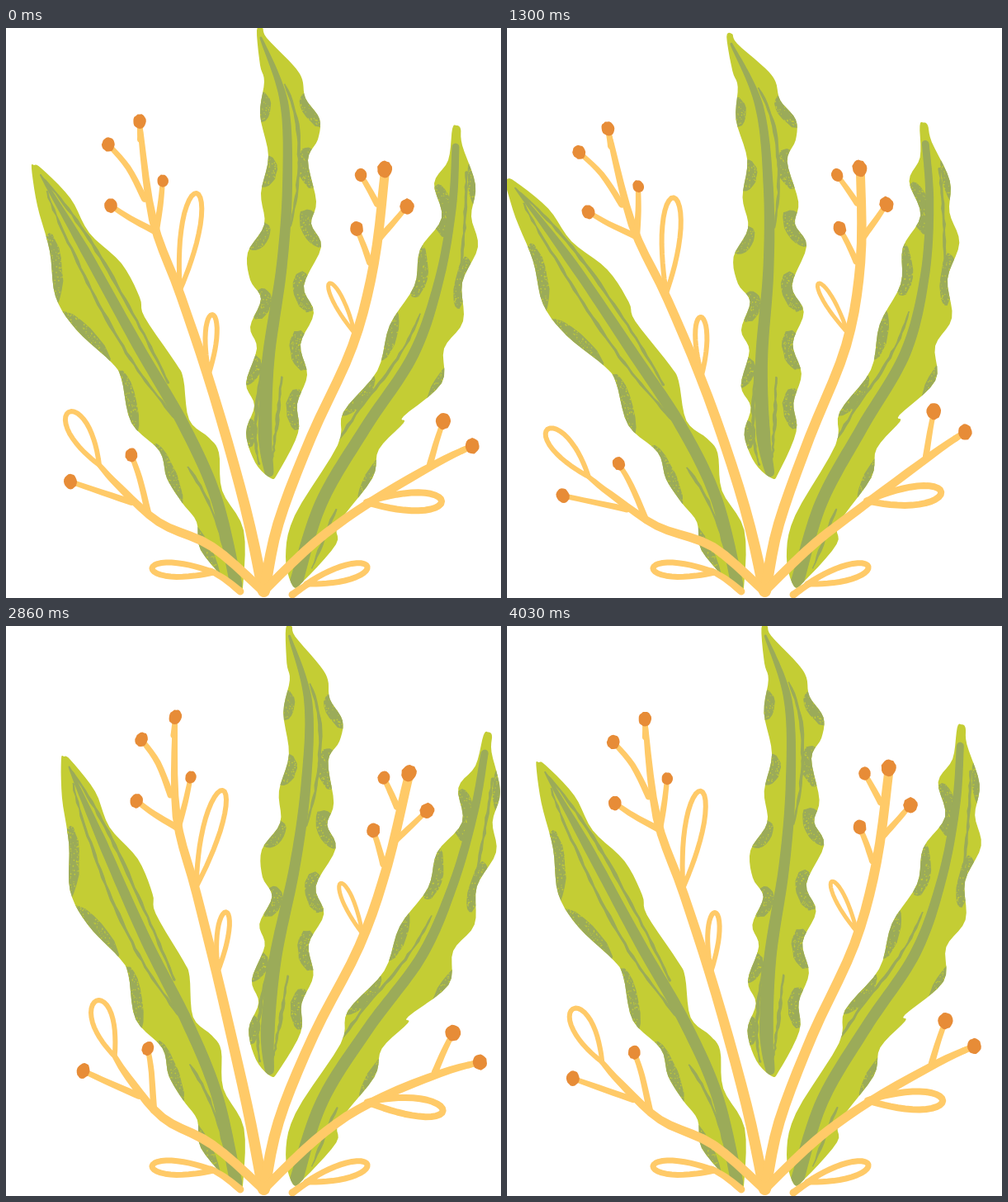
These frames come from a looping animation (600 px wide and 690 px high, 4.16 s). An HTML page:

```html
<!DOCTYPE html>
<html lang="en">
<head>
<meta charset="utf-8">
<title>Swaying plants</title>
<style>
html, body { margin: 0; width: 100%; height: 100%; overflow: hidden; background: #fff; }
svg { display: block; width: 100%; height: 100%; }
</style>
</head>
<body>
<svg id="stage" viewBox="0 0 600 690"></svg>
<script>
const NS = 'http://www.w3.org/2000/svg';
const stage = document.getElementById('stage');
const LIME = '#c4cd34', MOSS = '#9bab59', STEM = '#ffca68', BERRY = '#e78c37';
const LOOP = 4160, STEP = 130;

// Sideways sway in px at the tallest tip
const SWAY = [[0, 0], [650, -19], [1300, -38], [1820, -8], [2340, 20], [2925, 36], [3380, 27]];
const squashAt = t => 7 * Math.pow(Math.sin(Math.PI * Math.sqrt(t / LOOP)), 3);

let seed = 7;
const rnd = () => (seed = seed * 16807 % 2147483647) / 2147483647;

function pairs(text) {
  const n = text.trim().split(/\s+/).map(Number), out = [];
  for (let i = 0; i < n.length; i += 2) out.push([n[i], n[i + 1]]);
  return out;
}

// Cyclic spline through uneven keys
function keyed(keys, t) {
  const n = keys.length;
  const at = i => {
    const turn = Math.floor(i / n), k = keys[i - turn * n];
    return [k[0] + turn * LOOP, k[1]];
  };
  let i = n - 1;
  while (keys[i][0] > t) i--;
  const a = at(i - 1), b = at(i), c = at(i + 1), d = at(i + 2);
  const h = c[0] - b[0], u = (t - b[0]) / h, u2 = u * u, u3 = u2 * u;
  const m0 = (c[1] - a[1]) / (c[0] - a[0]) * h;
  const m1 = (d[1] - b[1]) / (d[0] - b[0]) * h;
  return (2 * u3 - 3 * u2 + 1) * b[1] + (u3 - 2 * u2 + u) * m0
    + (3 * u2 - 2 * u3) * c[1] + (u3 - u2) * m1;
}

function blend(a, b, c, d, u) {
  const c1 = c - a, c2 = 2 * a - 5 * b + 4 * c - d, c3 = 3 * (b - c) + d - a;
  return b + 0.5 * u * (c1 + u * (c2 + u * c3));
}

function smooth(pts, closed, steps = 5) {
  const n = pts.length, out = [];
  const at = i => closed ? pts[(i + n) % n] : pts[Math.max(0, Math.min(n - 1, i))];
  for (let i = 0; i < (closed ? n : n - 1); i++) {
    const a = at(i - 1), b = at(i), c = at(i + 1), d = at(i + 2);
    for (let j = 0; j < steps; j++) {
      const u = j / steps;
      out.push([blend(a[0], b[0], c[0], d[0], u), blend(a[1], b[1], c[1], d[1], u)]);
    }
  }
  if (!closed) out.push(pts[n - 1]);
  return out;
}

function angleAt(line, i) {
  const a = line[Math.max(0, i - 1)], b = line[Math.min(line.length - 1, i + 1)];
  return Math.atan2(b[1] - a[1], b[0] - a[0]);
}
const polar = ([x, y], ang, r) => [x + Math.cos(ang) * r, y + Math.sin(ang) * r];

// Brush stroke with changing width and round ends
function ribbon(line, widths, rough = 0) {
  const last = line.length - 1, right = Math.PI / 2;
  const one = [], two = [], head = [], tail = [];
  line.forEach((p, i) => {
    const ang = angleAt(line, i), f = i / last * (widths.length - 1);
    const k = Math.min(widths.length - 2, Math.floor(f));
    const r = (widths[k] + (widths[k + 1] - widths[k]) * (f - k)) / 2;
    one.push(polar(p, ang - right, r + (rnd() - 0.5) * rough));
    two.unshift(polar(p, ang + right, r + (rnd() - 0.5) * rough));
    for (let j = 1; j < 6; j++) {
      if (i === 0) head.push(polar(p, ang + right + j * Math.PI / 6, r));
      if (i === last) tail.push(polar(p, ang - right + j * Math.PI / 6, r));
    }
  });
  return [...one, ...tail, ...two, ...head];
}

// Point in an ellipse turned by ang, at (u, v) of its radii
const inOval = (o, u, v) => {
  const c = Math.cos(o.ang), s = Math.sin(o.ang), a = u * o.rx, b = v * o.ry;
  return [o.x + a * c - b * s, o.y + a * s + b * c];
};

function oval(o) {
  return Array.from({ length: 20 }, (_, i) => {
    const a = i * Math.PI / 10, k = 0.95 + rnd() * 0.1;
    return inOval(o, Math.cos(a) * k, Math.sin(a) * k);
  });
}

function grains(o) {
  return Array.from({ length: Math.round(o.rx * o.ry * 0.2) }, () => {
    const a = rnd() * 2 * Math.PI, d = Math.pow(rnd(), 0.4), r = 0.5 + rnd() * 0.6;
    const [x, y] = inOval(o, Math.cos(a) * d, Math.sin(a) * d);
    return [[x - r, y], [x, y - r], [x + r, y], [x, y + r]];
  });
}

const shapes = [];
function add(parent, tag, attrs) {
  const el = document.createElementNS(NS, tag);
  for (const k in attrs) el.setAttribute(k, attrs[k]);
  return parent.appendChild(el);
}
function shape(parent, bend, polys, attrs) {
  shapes.push({ el: add(parent, 'path', attrs), bend, polys });
}

// Speckled patches at even heights along one edge
function patches(parent, bend, edge, [top, gap, count, half, depth]) {
  for (let n = 0; n < count; n++) {
    const y = top + n * gap;
    let i = 0;
    edge.forEach((p, j) => { if (Math.abs(p[1] - y) < Math.abs(edge[i][1] - y)) i = j; });
    const o = { x: edge[i][0], y: edge[i][1], rx: depth, ry: half, ang: angleAt(edge, i) - Math.PI / 2 };
    shape(parent, bend, [oval(o)], { fill: MOSS });
    shape(parent, bend, grains(o), { fill: LIME });
  }
}

// Rough line beside the rib: start and end along it, offsets at start, middle, end
function vein(rib, [from, to, a, b, c]) {
  const line = [], last = rib.length - 1;
  for (let i = Math.round(from * last); i <= to * last; i++) {
    const v = (i / last - from) / (to - from);
    const off = a * (1 - v) * (1 - 2 * v) + 4 * b * v * (1 - v) + c * v * (2 * v - 1);
    line.push(polar(rib[i], angleAt(rib, i) - Math.PI / 2, off));
  }
  return ribbon(line, [2.5, 4, 3.5, 2.5], 1.6);
}

function blade(id, bend, b) {
  const left = pairs(b.left), right = pairs(b.right), rib = smooth(pairs(b.rib), false, 14);
  const outline = [smooth([...right, ...left.reverse()], true)];
  shape(stage, bend, outline, { fill: LIME });
  shape(add(stage, 'clipPath', { id }), bend, outline, {});
  const inner = add(stage, 'g', { 'clip-path': `url(#${id})` });
  patches(inner, bend, smooth(left.reverse(), false), b.leftPatches);
  patches(inner, bend, smooth(right, false), b.rightPatches);
  for (const v of b.veins) shape(inner, bend, [vein(rib, v)], { fill: MOSS });
  shape(inner, bend, [ribbon(rib, b.ribWidths)], { fill: MOSS });
}

// Teardrop loop, pointed at its base and round at its tip
function leaf([x0, y0, x1, y1, width]) {
  const dx = x1 - x0, dy = y1 - y0, len = Math.hypot(dx, dy);
  return Array.from({ length: 32 }, (_, i) => {
    const a = i * Math.PI / 16, u = (1 - Math.cos(a)) / 2;
    const v = 1.3 * width * Math.sin(a) * Math.sin(a / 2) / len;
    return [x0 + dx * u - dy * v, y0 + dy * u + dx * v];
  });
}

// Each twig starts at its berry
function sprig(bend, { stems, twigs = [], leaves, line }) {
  const brush = (text, widths) =>
    shape(stage, bend, [ribbon(smooth(pairs(text), false), widths)], { fill: STEM });
  for (const [text, ...widths] of stems) brush(text, widths);
  for (const [text] of twigs) brush(text, [6, 8]);
  for (const l of leaves) {
    shape(stage, bend, [leaf(l)],
      { fill: 'none', stroke: STEM, 'stroke-width': line, 'stroke-linejoin': 'round' });
  }
  for (const [text, r] of twigs) {
    const [x, y] = pairs(text)[0];
    shape(stage, bend, [oval({ x, y, rx: r, ry: r * 1.12, ang: 0 })], { fill: BERRY });
  }
}

// base, tip, sway x/y, squash x/y, curvature
const bends = {
  left: { base: [270, 680], tip: [36, 168], a: 1, b: -0.25, e: 0.7, c: 1.05, k: 2.1 },
  mid: { base: [320, 545], tip: [308, 0], a: 1, b: -0.022, e: 0, c: 1, k: 1.05 },
  right: { base: [355, 675], tip: [546, 120], a: 1.08, b: 0.27, e: 0, c: 1, k: 2 },
  tallLeft: { base: [312, 685], tip: [162, 113], a: 1.2, b: -0.1, e: 0.9, c: 0.75, k: 1.8 },
  tallRight: { base: [312, 685], tip: [459, 171], a: 0.83, b: 0.18, e: 0, c: 0.85, k: 2.4 },
  lowLeft: { base: [250, 632], tip: [80, 464], a: 0.92, b: -0.34, e: 1.2, c: 1.1, k: 1.3 },
  lowRight: { base: [400, 592], tip: [565, 506], a: 0.26, b: 0.6, e: 0, c: 0.9, k: 1.5 }
};

blade('clipLeft', bends.left, {
  left: `31 170 38 215 53 270 60 325 85 365 128 405 140 425 152 478 186 512 195 545
    213 574 231 598 236 632 270 672 283 681`,
  right: `34 166 43 170 78 206 101 248 140 285 162 326 168 350 206 406 215 425 222 474
    246 496 258 514 262 560 288 608 287 678`,
  rib: '42 178 95 268 160 385 215 480 255 570 279 674',
  ribWidths: [2, 11, 13, 14, 14, 15],
  veins: [[0.02, 0.5, 1, 13, 9], [0.06, 0.62, -4, -17, -1], [0.7, 0.92, -18, -10, -5]],
  leftPatches: [287, 86, 5, 44, 13],
  rightPatches: [0, 0, 0, 0, 0]
});

blade('clipMid', bends.mid, {
  left: `304 3 308 45 313 65 308 105 318 155 309 200 313 238 293 272 296 305 309 328
    296 362 304 388 291 430 301 457 291 490 302 526 321 545`,
  right: `311 0 316 12 348 45 359 62 363 85 380 110 378 135 366 160 376 210 370 237
    382 265 361 312 373 345 357 383 365 420 353 455 354 490 330 538`,
  rib: '309 12 337 90 341 190 334 290 318 400 314 490 319 538',
  ribWidths: [3, 10, 12, 13, 15, 17, 11],
  veins: [[0.13, 0.42, 6, 14, 5], [0.7, 0.93, 18, 14, 6], [0.62, 0.95, -2, -11, -10]],
  leftPatches: [97, 79, 6, 19, 13],
  rightPatches: [98, 73, 6, 25, 13]
});

blade('clipRight', bends.right, {
  left: `541 122 536 160 519 188 528 230 502 268 495 312 465 360 450 415 409 465
    402 505 350 590 339 640 348 676`,
  right: `546 118 551 122 553 142 569 190 564 228 572 265 553 308 554 355 531 388
    528 430 482 470 482 478 452 510 444 545 403 600 400 625 362 668`,
  rib: '545 144 541 215 525 305 494 395 435 485 382 575 352 670',
  ribWidths: [9, 10, 11, 13, 14, 15, 16],
  veins: [[0.08, 0.3, 14, 17, 22], [0.42, 0.84, -11, -18, -22], [0.83, 0.96, 20, 18, 13]],
  leftPatches: [220, 75, 4, 32, 13],
  rightPatches: [192, 117, 4, 32, 9]
});

sprig(bends.tallLeft, {
  stems: [['312 682 290 580 252 445 212 325 178 232 162 116', 14, 13, 12, 11, 10, 6]],
  twigs: [['162 113 163 135', 7.8], ['124 141 148 169 168 207', 7.8],
    ['127 215 150 230 180 246', 7.8], ['190 185 187 215 182 245', 6.8]],
  leaves: [[211, 317, 231, 200, 11], [246, 418, 250, 347, 7]],
  line: 6
});

sprig(bends.tallRight, {
  stems: [['313 682 330 600 370 495 420 385 446 285 459 178', 14, 13, 12, 12, 11]],
  twigs: [['459 171 458 195', 9], ['430 178 440 195 450 213', 7.2],
    ['486 216 470 235 453 254', 8.5], ['425 243 433 262 441 284', 8]],
  leaves: [[423, 370, 392, 309, 6]],
  line: 5
});

sprig(bends.lowLeft, {
  stems: [['312 682 250 628 185 598 135 553 113 529', 11, 11, 9, 6]],
  twigs: [['78 549 110 560 152 574', 8], ['152 517 162 545 173 590', 7.5]],
  leaves: [[113, 529, 76, 465, 12]],
  line: 6
});

sprig(bends.lowRight, {
  stems: [['312 682 375 622 440 575 520 528 565 506', 11, 11, 10, 7]],
  twigs: [['530 476 522 500 514 528', 8.8], ['565 506 552 512', 8.5]],
  leaves: [[437, 574, 528, 573, 11]],
  line: 8
});

// Ground leaves stay still
sprig(null, {
  stems: [['284 682 265 667 248 657', 9, 7], ['347 686 360 677 374 668', 9, 7]],
  leaves: [[252, 659, 177, 654, 8.5], [364, 673, 438, 652, 9]],
  line: 7
});

function warp([x, y], m, sway, squash) {
  if (!m) return [x, y];
  const vx = m.tip[0] - m.base[0], vy = m.tip[1] - m.base[1];
  const dx = x - m.base[0], dy = y - m.base[1];
  const s = Math.max(0, (dx * vx + dy * vy) / (vx * vx + vy * vy));
  const f = Math.pow(s, m.k - 1);
  return [x + f * (m.a * sway * dy / vy + m.e * squash * s),
    y + f * (m.b * sway * dx / vx + m.c * squash * s)];
}

function render(t) {
  const sway = keyed(SWAY, t), squash = squashAt(t);
  const spot = (p, bend) => warp(p, bend, sway, squash).map(v => v.toFixed(1)).join(' ');
  for (const { el, bend, polys } of shapes) {
    const d = polys.map(poly => 'M' + poly.map(p => spot(p, bend)).join('L') + 'Z');
    el.setAttribute('d', d.join(''));
  }
}

const start = performance.now();
let shown = -1;
function tick() {
  const t = Math.floor((performance.now() - start) % LOOP / STEP) * STEP;
  if (t !== shown) render(shown = t);
  requestAnimationFrame(tick);
}
tick();
</script>
</body>
</html>
```
